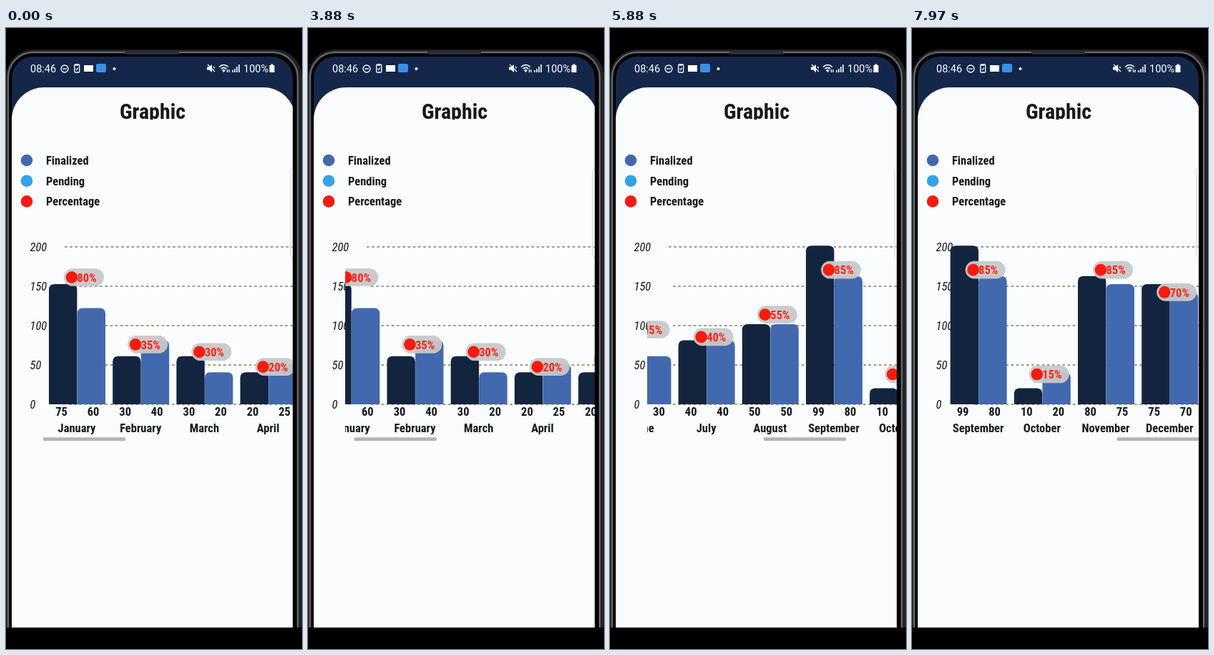
Write an HTML page that moves like this. It is 414x868 px and loops after 8000 ms.

```html
<!DOCTYPE html>
<html lang="en">
<head>
<meta charset="utf-8">
<title>Monthly chart</title>
<style>
  html, body { margin: 0; width: 100%; height: 100%; overflow: hidden; background: #000; }
  svg { display: block; width: 414px; height: 868px; }
  text { font: 700 16.5px "Roboto Condensed", Roboto, sans-serif; font-stretch: condensed; fill: #15171a; }
  .mid { text-anchor: middle; }
  .title { font-size: 30px; }
  .axis { font-weight: 400; font-style: italic; font-size: 16.5px; }
  .status { font: 400 14.5px Roboto, sans-serif; letter-spacing: 0; fill: #fff; }
  .pct { fill: #ff2414; }
</style>
</head>
<body>
<svg id="stage" viewBox="0 0 414 868">
  <defs>
    <clipPath id="phoneClip"><rect width="414" height="838"/></clipPath>
    <clipPath id="screenClip"><rect x="8" y="40" width="393" height="798"/></clipPath>
    <clipPath id="titleClip"><rect x="100" y="90" width="210" height="38"/></clipPath>
    <clipPath id="chartClip"><rect x="52" y="280" width="349" height="300"/></clipPath>
  </defs>

  <g clip-path="url(#phoneClip)">
    <rect y="30" width="414" height="860" rx="38" fill="#1f2124"/>
    <rect x="3" y="34" width="405" height="860" rx="35" fill="#000" stroke="#65686b" stroke-width="2.400"/>
    <rect x="8" y="40" width="393" height="860" rx="30" fill="#14274a"/>
    <rect x="167" y="32" width="75" height="5" rx="2" fill="#2c2e31"/>
  </g>
  <g clip-path="url(#screenClip)">
    <path d="M8 838V128a45 45 0 0 1 45-45H360a45 45 0 0 1 45 45V838z" fill="#fbfcfd"/>
  </g>

  <g fill="none" stroke="#fff" stroke-width="1.3">
    <text class="status" x="34" y="61.500" stroke="none">08:46</text>
    <circle cx="82" cy="57" r="5"/><path d="M79 57h6"/>
    <rect x="95.700" y="51" width="7" height="11" rx="1"/><path d="M97.500 57l1.300 1.500 2-3M97 52h4"/>
    <rect x="109" y="52" width="13" height="9" fill="#fff" stroke="none"/>
    <rect x="126" y="50" width="14" height="12" rx="2" fill="#3b8fe6" stroke="none"/>
    <circle cx="151.500" cy="57" r="2" fill="#fff" stroke="none"/>
    <path d="M281 54.500h3l4-3.500v11l-4-3.500h-3z" fill="#fff" stroke="none"/>
    <path d="M282 51l10 10M290 54l2 2"/>
    <path d="M298 54.500q6.500-6 13 0M300.500 57.200q4-3.500 8 0" stroke-width="1.600"/>
    <path d="M302 59q2.500-2 5 0l-2.500 3z" fill="#fff" stroke="none"/>
    <path d="M309.500 58v4M312 58v4"/>
    <path d="M317 59v3M320 57v5M323 54v8M326 51v11" stroke-width="1.600"/>
    <text class="status" x="332" y="61.500" stroke="none">100%</text>
    <path d="M370.500 50.500h3v1.500h2v10h-7v-10h2z" fill="#fff" stroke="none"/>
  </g>

  <g clip-path="url(#titleClip)"><text id="title" class="title mid" x="205" y="127">Graphic</text></g>
  <g id="legend"></g>
  <g id="axis"></g>
  <g clip-path="url(#chartClip)"><g id="months"></g></g>
  <g clip-path="url(#screenClip)">
    <rect id="scrollbar" x="52" y="572.300" width="115" height="4.600" rx="1" fill="#b3b4b5"/>
    <rect x="398" y="196" width="9" height="124" rx="4" fill="#fbfcfd" fill-opacity=".3" stroke="#d5d6d6"/>
  </g>

  <g id="hand" opacity="0">
    <g id="touch" fill="#55585c">
      <circle r="14.500" opacity=".28"/><circle r="9" opacity=".45"/>
    </g>
    <g fill="#fdfdfe" stroke="#0c0e10" stroke-width="2.800" stroke-linejoin="round" stroke-linecap="round">
      <path d="M-1 81C-3 64-14 54-20 41C-25 31-15 25-9 34L-1 44L-6 8C-7-1 4-2 6 6L11 27C12 20 20 20 22 27C24 21 31 22 32 29C35 24 40 26 41 32C43 48 37 58 32 67L30 81Z"/>
      <path d="M11 27l2 11M22 28l1 10M32 30v9" fill="none" stroke-width="2"/>
    </g>
  </g>
</svg>

<script>
const $ = id => document.getElementById(id);
const DURATION = 8000, PITCH = 89.2, BASE = 526, UNIT = 2.24;
const NAVY = '#13243f', BLUE = '#4268ae', RED = '#fb1a0c';

// month, dark bar, blue bar, percentage
const DATA = [
  ['January', 75, 60, 80], ['February', 30, 40, 35], ['March', 30, 20, 30],
  ['April', 20, 25, 20], ['May', 20, 20, 25], ['June', 30, 30, 45],
  ['July', 40, 40, 40], ['August', 50, 50, 55], ['September', 99, 80, 85],
  ['October', 10, 20, 15], ['November', 80, 75, 85], ['December', 75, 70, 70]
];

const text = (x, y, value, cls = '') => `<text class="${cls}" x="${x}" y="${y}">${value}</text>`;
const dot = (x, y, fill) => `<circle cx="${x}" cy="${y}" r="8.3" fill="${fill}"/>`;

function bar(x, value, fill) {
  const h = value * UNIT;
  return `<path d="M${x} ${BASE}v${8 - h}q0-8 8-8h23.4q8 0 8 8V${BASE}z" fill="${fill}"/>`;
}

function month([name, dark, blue, pct], i) {
  const y = 515.3 - 2.085 * pct;
  return `<g transform="translate(${60 + i * PITCH})">
    ${bar(0, dark, NAVY)}${bar(39.6, blue, BLUE)}
    ${text(17.5, 542, dark, 'mid')}${text(62, 542, blue, 'mid')}${text(39, 565, name, 'mid')}
    <rect x="21" y="${y - 12.3}" width="56" height="24.600" rx="12.300" fill="#c8c9ca" fill-opacity=".95"/>
    ${dot(32, y, RED)}${text(39.5, y + 6.3, pct + '%', 'pct')}</g>`;
}

$('legend').innerHTML = [['Finalized', BLUE], ['Pending', '#35a2e8'], ['Percentage', RED]]
  .map(([name, fill], i) => dot(29, 185 + i * 28.7, fill) + text(56, 191 + i * 28.7, name)).join('');

$('axis').innerHTML = [200, 150, 100, 50, 0].map((value, i) => {
  const y = 306 + i * 55;
  return text(33.5, y + 6, value, 'axis') +
    `<path d="M${i ? 88 : 82} ${y}H401" stroke="#a19d86" stroke-width="1.800" stroke-dasharray="3.600 3.600"/>`;
}).join('');

$('months').innerHTML = DATA.map(month).join('');

// Tighten the text when no condensed face is available.
if ($('title').getComputedTextLength() > 97) $('stage').style.letterSpacing = '-0.045em';

// time, offset, speed (px per ms)
const SCROLL = [
  [3630, 0, 0], [4500, 243, .2], [5420, 390, .19], [6340, 604, .17], [7600, 720, 0]
];

const ramp = (t, from, to) => Math.min(1, Math.max(0, (t - from) / (to - from)));
const smooth = u => u * u * (3 - 2 * u);

function scrollAt(t) {
  const next = SCROLL.findIndex(step => step[0] > t);
  if (next === 0) return 0;
  if (next < 0) return SCROLL[SCROLL.length - 1][1];
  const [t0, x0, v0] = SCROLL[next - 1], [t1, x1, v1] = SCROLL[next];
  const d = t1 - t0, u = (t - t0) / d;
  return x0 + (x1 - x0) * smooth(u) + d * u * (1 - u) * (v0 * (1 - u) - v1 * u);
}

function draw(t) {
  const offset = scrollAt(t);
  $('months').setAttribute('transform', `translate(${-offset})`);
  $('scrollbar').setAttribute('x', 52 + offset * .3262);

  const x = 290 - 128 * smooth(ramp(t, 870, 1780));
  $('hand').setAttribute('transform', `translate(${x} 462)`);
  $('hand').setAttribute('opacity', ramp(t, 350, 600) * (1 - ramp(t, 2150, 2420)));
  $('touch').setAttribute('opacity', ramp(t, 650, 850) * (1 - ramp(t, 1800, 2000)));
}

function tick() {
  draw(performance.now() % DURATION);
  requestAnimationFrame(tick);
}
tick();
</script>
</body>
</html>
```
